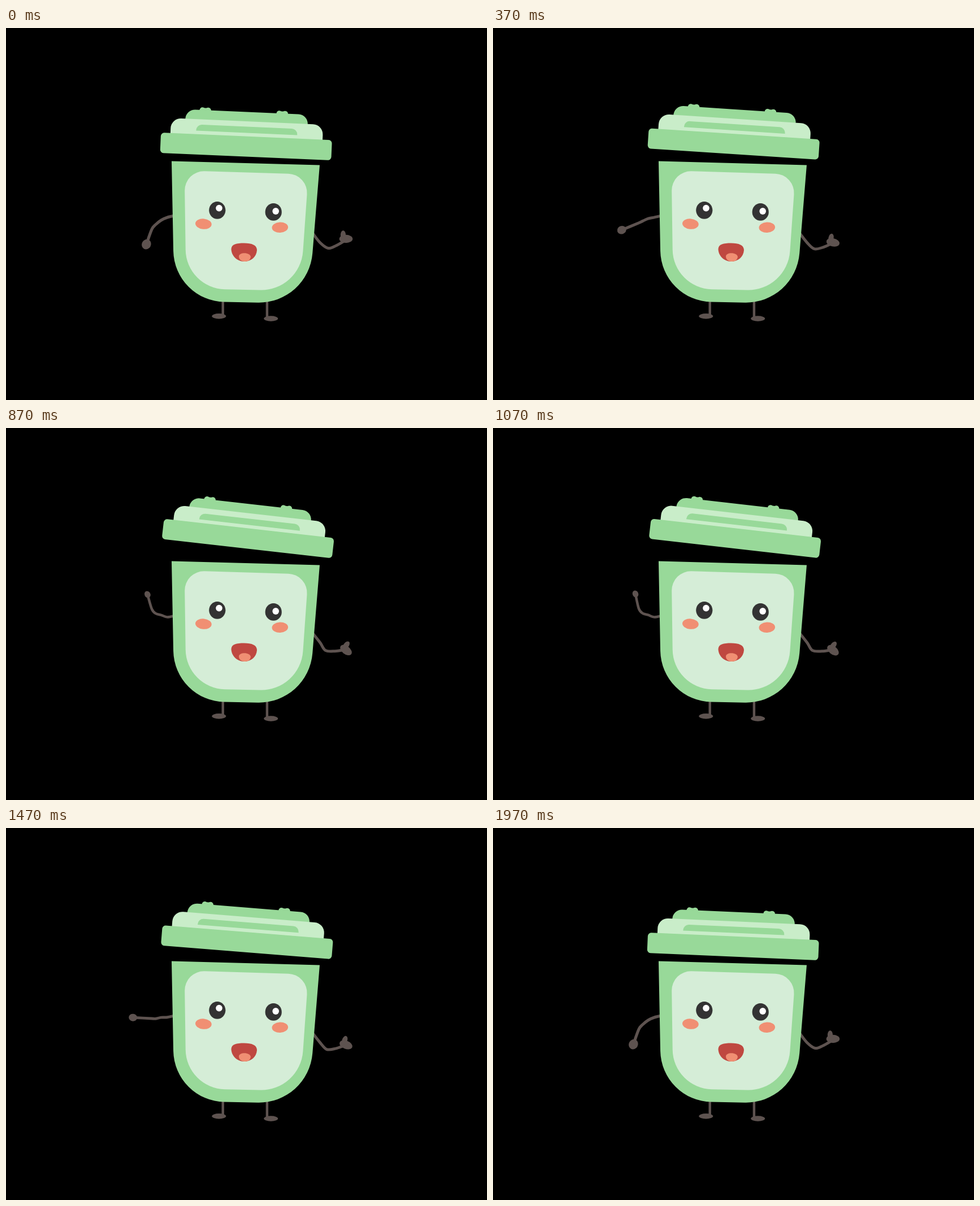
An HTML page with a canvas for the animation above (2.01 s loop, 851 by 658 pixels).

```html
<!DOCTYPE html>
<html lang="en">
<head>
<meta charset="utf-8">
<title>Waving bin</title>
<style>
html, body { margin: 0; width: 100%; height: 100%; overflow: hidden; background: #000; }
canvas { display: block; }
</style>
</head>
<body>
<canvas id="stage" width="851" height="658"></canvas>
<script>
const ctx = document.getElementById('stage').getContext('2d');
const LOOP = 2010, FPS = 30, LAST = 59;
const GREEN = '#98d999', PALE = '#d5edd7', RIM = '#c9edc9', LIMB = '#5e5350';
const DARK = '#333333', CORAL = '#f08f73', RED = '#bf4840';
const RAD = Math.PI / 180;

const MOUTH = new Path2D('M398.5 391 C399 382 408 380.5 421 380.5 C435 380.5 444 384 444 393 C443 405 434 413 421 413 C408 412.5 399 403 398.5 391 Z');
const TONGUE = new Path2D('M412 404 C412 396.5 432 396 433 405 C432 410 429 413 422 413 C416 412.5 412 409 412 404 Z');

function fill(path, color) {
  ctx.fillStyle = color;
  ctx.fill(path);
}

function oval(x, y, rx, ry, color, turn = 0) {
  const path = new Path2D();
  path.ellipse(x, y, rx, ry, turn, 0, Math.PI * 2);
  fill(path, color);
}

function box(x, y, w, h, r, color) {
  const path = new Path2D();
  path.roundRect(x, y, w, h, r);
  fill(path, color);
}

// Polygon with a radius at each corner; starts midway along the last edge
function rounded(corners, color) {
  const path = new Path2D();
  const [x0, y0] = corners[0], [x1, y1] = corners.at(-1);
  path.moveTo((x0 + x1) / 2, (y0 + y1) / 2);
  corners.forEach(([x, y, r], i) => {
    const [nx, ny] = corners[(i + 1) % corners.length];
    path.arcTo(x, y, nx, ny, r);
  });
  path.closePath();
  fill(path, color);
}

// Smooth stroke through a few joints
function limb(joints, width) {
  const at = i => joints[Math.max(0, Math.min(joints.length - 1, i))];
  ctx.strokeStyle = LIMB;
  ctx.lineWidth = width;
  ctx.lineCap = ctx.lineJoin = 'round';
  ctx.beginPath();
  ctx.moveTo(...joints[0]);
  for (let i = 0; i < joints.length - 1; i++) {
    const [a, b, c, d] = [at(i - 1), at(i), at(i + 1), at(i + 2)];
    ctx.bezierCurveTo(
      b[0] + (c[0] - a[0]) / 6, b[1] + (c[1] - a[1]) / 6,
      c[0] - (d[0] - b[0]) / 6, c[1] - (d[1] - b[1]) / 6, c[0], c[1]);
  }
  ctx.stroke();
}

// The hand circles the elbow while the joints rise with the swing p
function leftArm(p) {
  const turn = (119.5 + 129 * p) * RAD;
  const reach = 47 + 8 * (p - .5) ** 2 + p * 2;
  const hand = [272.5 + Math.cos(turn) * reach, 340 + Math.sin(turn) * reach];
  limb([
    [300, 331.5], [285.5, 335 - p / 2], [274.5, 340 - 9.5 * p],
    [265, 347.5 - 20 * p], [258, 356 - 37 * p], hand
  ], 5.2 - .7 * p);
  oval(...hand, 9 - 2.9 * p, 8.1 - 3 * p, LIMB, turn);
}

function rightArm(p) {
  limb([
    [543, 363.5], [556, 380], [570 - 5 * p, 389.5 + 4 * p],
    [584 - 2 * p, 385 + 10 * p], [598 - p, 377 + 16 * p]
  ], 5);
  ctx.save();
  ctx.translate(601.5, 373 + 20.5 * p);
  ctx.rotate(40 * p * RAD);
  oval(0, 0, 11.8, 7.2, LIMB);
  oval(-5, -7, 4.6, 7.8, LIMB);
  ctx.restore();
}

function leg(x, footX, footY) {
  box(x - 2.2, 480, 4.4, footY - 481, 0, LIMB);
  oval(footX, footY, 12.5, 4.7, LIMB);
}

function eye(x, y, shineX, shineY) {
  oval(x, y, 14.6, 15.4, DARK);
  oval(shineX, shineY, 5.8, 5.9, '#fff');
}

function body() {
  rounded([[293, 235.5, 0], [555, 242.5, 0], [535, 487.3, 95], [297.8, 483, 92]], GREEN);
  rounded([[315.7, 252.3, 34], [535, 258.8, 34], [520.5, 465, 74], [318.7, 460.7, 71]], PALE);
}

function face() {
  eye(373.8, 322.3, 377, 318.6);
  eye(473.2, 325.4, 477.2, 324);
  oval(349.4, 346.6, 14.4, 9.2, CORAL, 5 * RAD);
  oval(484.8, 352.7, 14.3, 9.2, CORAL, -3 * RAD);
  fill(MOUTH, RED);
  fill(TONGUE, CORAL);
}

// Hinged at the right, opening with p
function lid(p) {
  ctx.save();
  ctx.translate(630, 252);
  ctx.rotate(4.1 * p * RAD);
  ctx.translate(-205.3, -42.3);
  ctx.rotate(2.5 * RAD);
  for (const x of [-74.7, 61.4]) {
    for (const side of [-5.1, 5.1]) oval(x + side, -60.8, 5.2, 5.2, GREEN);
    box(x - 5, -65, 10, 6, 0, GREEN);
  }
  box(-109.5, -61.2, 216.8, 40, [17, 17, 0, 0], GREEN);
  box(-134.7, -44.7, 269.4, 32, [18, 18, 0, 0], RIM);
  box(-89.5, -35.2, 179, 11, [10, 10, 0, 0], GREEN);
  box(-151.5, -18, 303, 35.8, 6, GREEN);
  ctx.restore();
}

function draw(now) {
  const step = Math.min(LAST, Math.floor((now % LOOP + 4) * FPS / 1000));
  const p = (1 - Math.cos(step / LAST * Math.PI * 2)) / 2;
  ctx.fillStyle = '#000';
  ctx.fillRect(0, 0, 851, 658);
  leftArm(p);
  rightArm(p);
  leg(383.7, 376.8, 509.7);
  leg(461.9, 468.7, 514);
  body();
  face();
  lid(p);
}

const start = performance.now();
function tick() {
  draw(performance.now() - start);
  requestAnimationFrame(tick);
}
tick();
</script>
</body>
</html>
```
